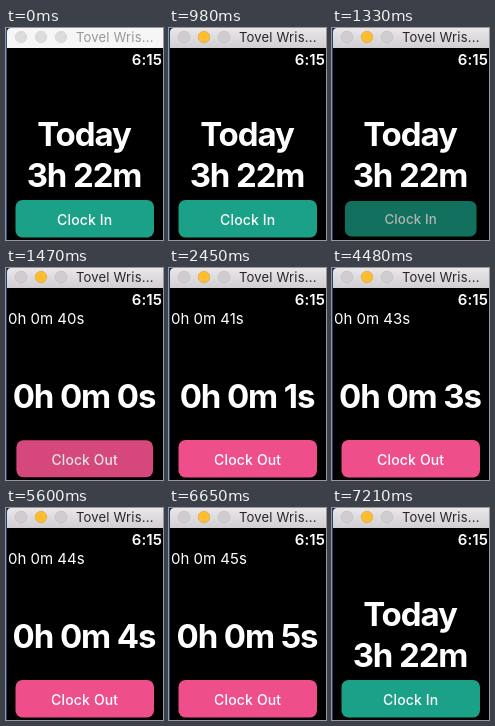
An HTML page that plays this animation: 157 px wide and 212 px high, repeating every 8.89 s.

```html
<!DOCTYPE html>
<html lang="en">
<head>
<meta charset="utf-8">
<title>Time clock</title>
<style>
  html, body { margin: 0; width: 100%; height: 100%; overflow: hidden; background: #000; }
  svg { display: block; width: 157px; height: 212px; font-family: Inter, "Liberation Sans", sans-serif; fill: #fff; }
  .big { font-size: 33px; font-weight: 700; letter-spacing: -1.1px; text-anchor: middle; }
  .small { font-size: 15px; }
  .clock { font-size: 15px; font-weight: 600; letter-spacing: .1px; text-anchor: end; }
  .label { font-size: 14px; font-weight: 500; letter-spacing: .15px; text-anchor: middle; }
  .title { font-size: 13px; letter-spacing: .2px; fill: #979797; }
  .dot { fill: #dcdcdc; stroke: #cfcfcf; stroke-width: .6; }
  .bar { fill: #f6f6f6; }
  .active .title { fill: #262626; }
  .active .bar { fill: url(#barFill); }
  .active .dot { fill: #cfcdcf; stroke: #bdbbbd; }
  .active .mid { fill: #fdbd30; stroke: #dfa032; }
  #button { transform-origin: 78.7px 190.5px; }
</style>
</head>
<body>
<svg viewBox="0 0 157 212">
  <defs>
    <linearGradient id="barFill" x2="0" y2="1">
      <stop stop-color="#e9e7e9"/>
      <stop offset="1" stop-color="#d1cfd1"/>
    </linearGradient>
  </defs>
  <rect width="157" height="212" fill="#000"/>
  <rect id="edge" width="1" height="212"/>
  <g id="window">
    <path class="bar" d="M1 20V4Q1 0 5 0H157V20Z"/>
    <circle class="dot" cx="15" cy="9" r="5.8"/>
    <circle class="dot mid" cx="35" cy="9" r="5.8"/>
    <circle class="dot" cx="55" cy="9" r="5.8"/>
    <text class="title" x="70" y="14">Tovel Wris...</text>
  </g>
  <text class="clock" x="156" y="36.7">6:15</text>
  <g id="idle">
    <text class="big" x="78" y="117.7">Today</text>
    <text class="big" x="78" y="159">3h 22m</text>
  </g>
  <g id="running">
    <text class="small" id="total" x="2" y="56"></text>
    <text class="big" id="session" x="78" y="140.3"></text>
  </g>
  <g id="button">
    <rect id="face" x="9.5" y="172" width="138.5" height="37.5" rx="7"/>
    <text class="label" id="label" x="78.7" y="196.7"></text>
  </g>
</svg>
<script>
  const LOOP = 8890, FOCUS = 980, CLOCK_IN = 1400, CLOCK_OUT = 7070;
  const ticks = [2450, 3500, 4480, 5600, 6650];

  // Button press: [time, scale, opacity], each held until the next
  const press = [
    [0, 1, 1],
    [1260, .97, .85], [1330, .95, .7], [1400, .965, .77], [1470, .987, .9], [1540, .996, .97], [1610, 1, 1],
    [6930, .97, .8], [7000, .95, .7], [7070, .97, .8], [7140, .99, .93], [7210, 1, 1]
  ];

  const el = id => document.getElementById(id);
  const show = (id, on) => el(id).setAttribute("visibility", on ? "visible" : "hidden");
  const setText = (id, text) => {
    if (el(id).textContent !== text) el(id).textContent = text;
  };

  function draw(t) {
    const running = t >= CLOCK_IN && t < CLOCK_OUT;
    const seconds = ticks.filter(tick => t >= tick).length;
    const [, scale, opacity] = press.filter(step => t >= step[0]).pop();

    el("window").setAttribute("class", t >= FOCUS ? "active" : "");
    el("edge").setAttribute("fill", t >= FOCUS ? "#1d4078" : "#234f8a");
    show("idle", !running);
    show("running", running);
    setText("total", `0h 0m ${40 + seconds}s`);
    setText("session", `0h 0m ${seconds}s`);
    setText("label", running ? "Clock Out" : "Clock In");
    el("face").setAttribute("fill", running ? "#ee4f8a" : "#1aa187");
    el("button").style.transform = `scale(${scale})`;
    el("button").style.opacity = opacity;
  }

  const start = performance.now();
  function frame() {
    draw((performance.now() - start) % LOOP);
    requestAnimationFrame(frame);
  }
  frame();
</script>
</body>
</html>
```
